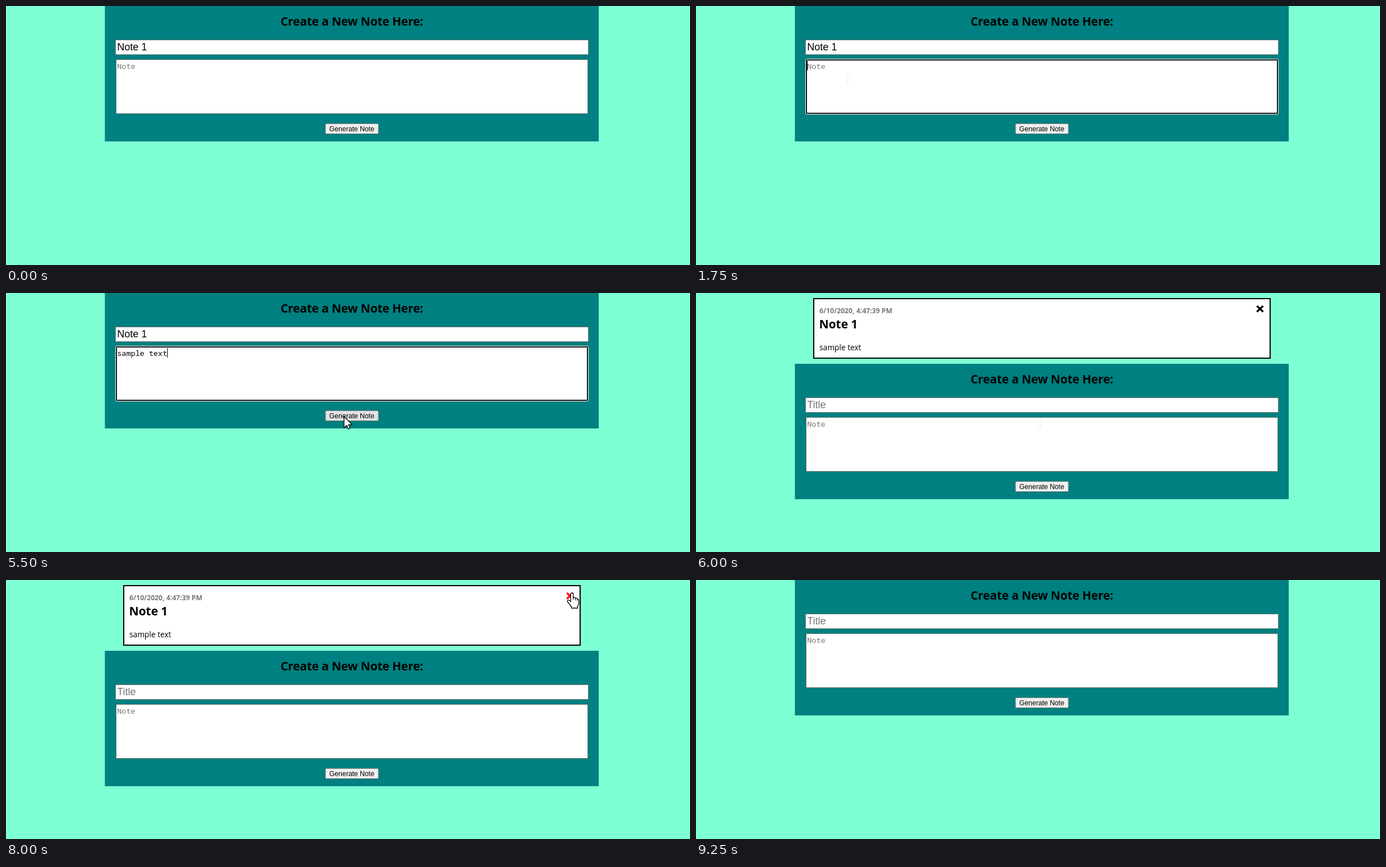
An HTML page that plays this animation: 1214 px wide and 461 px high, repeating every 9.75 s.

```html
<!DOCTYPE html>
<html lang="en">
<head>
<meta charset="utf-8">
<title>Notes</title>
<style>
  html, body { margin: 0; width: 100%; height: 100%; overflow: hidden; background: #7fffd4; }
  svg { display: block; width: 1214px; height: 461px; }
  text { white-space: pre; }
  .ui { font-family: "Open Sans", "Noto Sans", sans-serif; }
  .bold { font-weight: 700; }
  .field { font-family: "Liberation Sans", Arial, sans-serif; }
  .mono { font: 13.44px "Noto Sans Mono", "DejaVu Sans Mono", monospace; }
  .box { fill: #fff; stroke: #767676; }
</style>
</head>
<body>
<svg viewBox="0 0 1214 461">
  <g id="note">
    <rect x="209" y="10" width="810" height="106" fill="#fff" stroke="#000" stroke-width="2"/>
    <text class="ui bold" x="219" y="35.5" font-size="12.2" fill="#777">6/10/2020, 4:47:39 PM</text>
    <text class="ui bold" x="218.5" y="63" font-size="21" letter-spacing="-.1">Note 1</text>
    <text class="ui" x="219" y="102" font-size="13.7">sample text</text>
    <path id="close" d="M995.5 23 L1006.5 33.5 M1006.5 23 L995.5 33.5" stroke-width="3.4"/>
  </g>
  <g id="form">
    <rect x="175.5" width="876.5" height="241" fill="#008080"/>
    <text class="ui bold" x="613.8" y="34.7" font-size="21" letter-spacing="-.22" text-anchor="middle">Create a New Note Here:</text>
    <rect class="box" x="194.5" y="60.5" width="839" height="26"/>
    <text id="title" class="field" x="197.3" y="79.3" font-size="18"></text>
    <rect class="box" x="195.5" y="95.5" width="837" height="96"/>
    <g id="ring" fill="none">
      <rect x="194.5" y="94.5" width="839" height="98" rx="2" stroke="#fff"/>
      <rect x="196" y="96" width="836" height="95" rx="1" stroke="#101010" stroke-width="2"/>
    </g>
    <text id="body" class="mono" x="197.3" y="111.7"></text>
    <rect id="caret" y="98" width="1" height="17"/>
    <rect id="button" x="567" y="209.5" width="94" height="18" rx="1.5" stroke="#767676"/>
    <text class="field" x="613.8" y="223" font-size="12.2" text-anchor="middle">Generate Note</text>
  </g>
  <g id="arrow">
    <path transform="scale(1.17)" d="M0 0 V17 L4 13.2 L6.6 19 L9.2 17.9 L6.7 12.2 H12.2 Z"
      fill="#fff" stroke="#000" stroke-width="1.1" stroke-linejoin="round"/>
  </g>
  <path id="beam" d="M-4 -8.5 H-1 L0 -7.5 L1 -8.5 H4 M0 -7.5 V7.5 M-4 8.5 H-1 L0 7.5 L1 8.5 H4"
    fill="none" stroke="#e6e6e6"/>
  <g id="hand" stroke="#000" stroke-width="1.3" stroke-linejoin="round">
    <path fill="#fff" d="M-2.3 2 Q0 -1 2.3 2 V9 Q5 7.5 6 10 Q9 8.8 9.3 11.5 Q12 10.8 12 14 V19
      Q12 22 10 24.5 V27.5 H-1 V25 Q-4 21 -8 16 Q-8.3 12.2 -5 13.5 L-2.3 16 Z"/>
    <path d="M2.3 9 V13 M6 10 V14 M9.3 11.5 V14.5" stroke-width="1"/>
  </g>
</svg>
<script>
  const LOOP = 9750;
  const CHAR = 8.064;
  const MESSAGE = "sample text";

  const START = {
    title: "Note 1", typed: 0, focus: false, caret: false,
    posted: false, hover: false, close: "#000", pointer: null
  };

  // Each step adds its changes to the state before it.
  // A pointer is [shape, x, y].
  const STEPS = [
    [1000, { pointer: ["arrow", 520, 385] }],
    [1250, { pointer: ["arrow", 385, 262] }],
    [1500, { pointer: ["beam", 283, 147] }],
    [1750, { pointer: ["beam", 269, 130], focus: true, caret: true }],
    [2250, { caret: false }],
    [2750, { typed: 1, caret: true }],
    [3000, { typed: 3 }],
    [3250, { typed: 4 }],
    [3500, { typed: 5 }],
    [3750, { typed: 7 }],
    [4000, { typed: 9 }],
    [4250, { typed: 10 }],
    [4500, { typed: 11 }],
    [5000, { pointer: ["beam", 400, 162], caret: false }],
    [5250, { pointer: ["arrow", 545, 206] }],
    [5500, { pointer: ["arrow", 600, 220], hover: true, caret: true }],
    [6000, { pointer: ["beam", 611, 231], hover: false, focus: false, caret: false,
             typed: 0, title: "", posted: true }],
    [7000, { pointer: ["beam", 685, 198] }],
    [7250, { pointer: ["arrow", 800, 138] }],
    [7500, { pointer: ["arrow", 915, 75] }],
    [7750, { pointer: ["arrow", 978, 38] }],
    [8000, { pointer: ["hand", 1004.5, 22.5], close: "#f00" }],
    [8500, { pointer: ["arrow", 996, 23], posted: false }],
    [8750, { pointer: ["beam", 965, 150] }],
    [9000, { pointer: ["arrow", 880, 340] }],
    [9250, { pointer: null }]
  ];

  const el = id => document.getElementById(id);
  const show = (id, on) => el(id).setAttribute("visibility", on ? "visible" : "hidden");
  const move = (id, x, y) => el(id).setAttribute("transform", `translate(${x} ${y})`);

  function fill(id, value, hint) {
    el(id).textContent = value || hint;
    el(id).setAttribute("fill", value ? "#000" : "#757575");
  }

  function stateAt(time) {
    const past = STEPS.filter(([at]) => at <= time);
    return Object.assign({}, START, ...past.map(([, change]) => change));
  }

  function draw(s) {
    show("note", s.posted);
    move("form", 0, s.posted ? 126 : 0);
    fill("title", s.title, "Title");
    fill("body", MESSAGE.slice(0, s.typed), "Note");
    show("ring", s.focus);
    show("caret", s.caret);
    el("caret").setAttribute("x", Math.round(197.4 + s.typed * CHAR));
    el("button").setAttribute("fill", s.hover ? "#e2e2e2" : "#efefef");
    el("close").setAttribute("stroke", s.close);
    for (const shape of ["arrow", "beam", "hand"]) {
      const on = s.pointer && s.pointer[0] === shape;
      show(shape, on);
      if (on) move(shape, s.pointer[1], s.pointer[2]);
    }
  }

  const begin = performance.now();

  function tick() {
    draw(stateAt((performance.now() - begin) % LOOP));
    requestAnimationFrame(tick);
  }
  tick();
</script>
</body>
</html>
```
